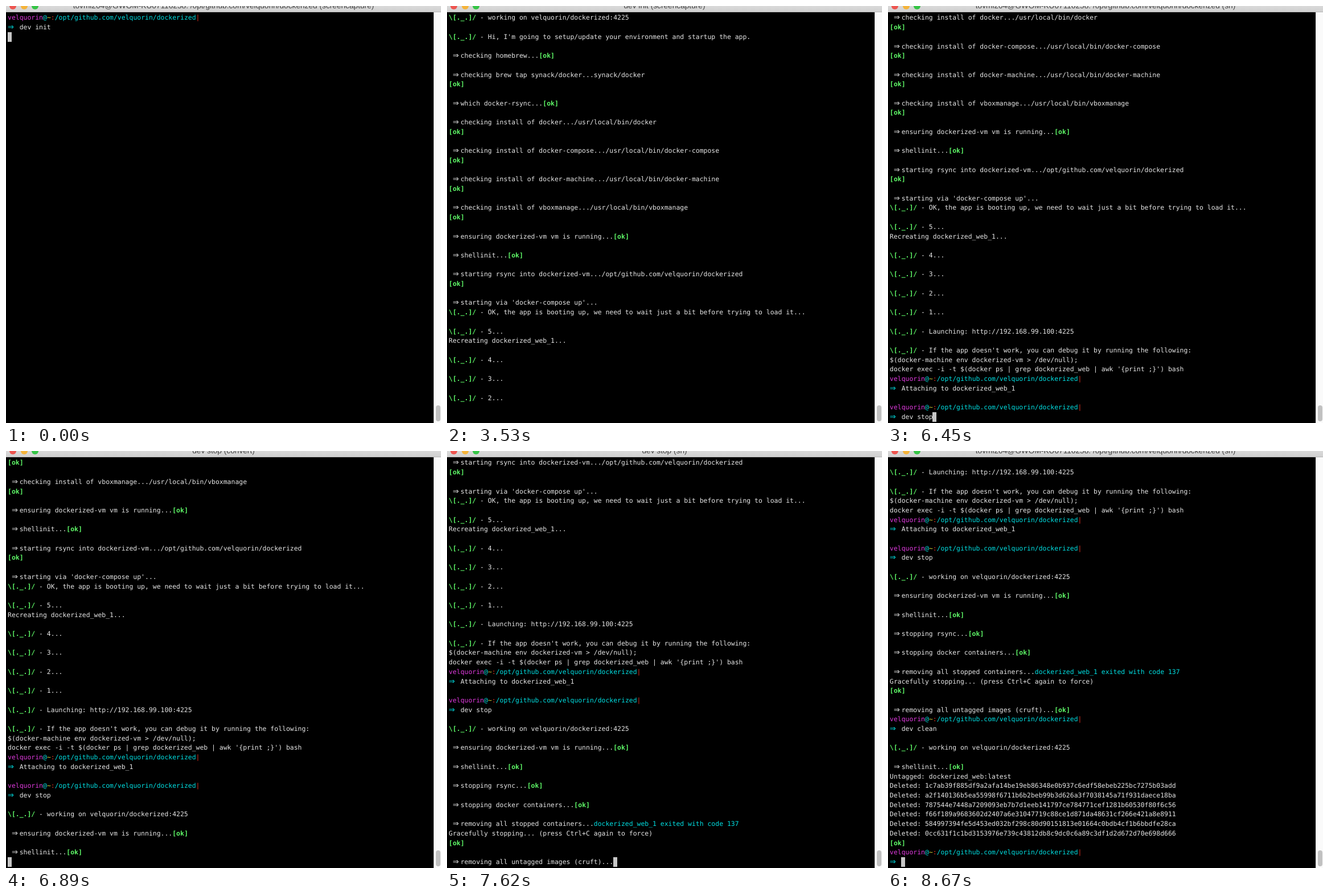
These frames come from a looping animation (764x733 px, 8690 ms). An HTML page:

```html
<!DOCTYPE html>
<html lang="en">
<head>
<meta charset="utf-8">
<title>Terminal session</title>
<style>
  html, body { margin: 0; width: 100%; height: 100%; overflow: hidden; background: #000; }
  body { position: relative; }
  #bar {
    position: absolute; top: -11px; left: 0; width: 764px; height: 22px; z-index: 1; overflow: hidden;
    background: linear-gradient(#e2e2e2, #d0d0d0); box-shadow: inset 0 -1px #b8b8b8;
    font: 13.7px/22px "Liberation Sans", sans-serif; color: #444; text-align: center; white-space: nowrap;
    text-rendering: geometricPrecision;
  }
  #bar i { position: absolute; top: 5px; width: 12px; height: 12px; border-radius: 50%; }
  #screen {
    position: absolute; left: 3px; top: 12.4px; margin: 0; color: #e6e6e6;
    font: 11.444px/16.707px "DejaVu Sans Mono", monospace;
    font-variant-ligatures: none; text-rendering: geometricPrecision;
  }
  #cursor { position: absolute; width: 7px; height: 17px; background: #c7c7c7; }
  #scroll { position: absolute; left: 751px; top: 11px; width: 13px; height: 722px; background: #fafafa; box-shadow: inset 1px 0 #e8e8e8; }
  #scroll i { position: absolute; left: 4px; top: 691px; width: 8px; height: 28px; border-radius: 4px; background: #c1c1c1; }
  .green { color: #5ffa68; font-weight: bold; }
  .cyan { color: #00dfe2; }
  .magenta { color: #e03ade; }
  .yellow { color: #dedb36; }
  .red { color: #e03020; }
  .arrow { display: inline-block; width: 6.89px; font: 13px/0 "DejaVu Sans", sans-serif; }
</style>
</head>
<body>
<div id="bar">
  <i style="left:6px;background:#ee5550"></i><i style="left:26px;background:#f5b43a"></i><i style="left:45px;background:#35c546"></i>
  <span id="title"></span>
</div>
<pre id="screen"></pre>
<div id="cursor"></div>
<div id="scroll"><i></i></div>
<script>
const LOOP = 8690, ROWS = 43, ROW = 16.707, CELL = 6.89;
const USER = 'velquorin', PATH = `/opt/github.com/${USER}/dockerized`;

// Each line is a list of [class, text] segments.
const ok = ['green', '[ok]'];
const plain = text => [['', text]];
const bot = text => [['green', '\\[._.]/'], ['', ' - ' + text]];
const step = (text, ...rest) => [['', ' '], ['arrow', '⇒'], ['', ' ' + text], ...rest];
const shell = text => [['cyan arrow', '⇒'], ['', '  ' + text]];
const blank = [], okLine = [ok];
const prompt = [['magenta', USER], ['cyan', '@'], ['yellow', '~'], ['red', ':'], ['cyan', PATH], ['red', '|']];
const working = bot(`working on ${USER}/dockerized:4225`);
const ensuring = step('ensuring dockerized-vm vm is running...', ok);
const shellinit = step('shellinit...', ok);
const install = name => [step(`checking install of ${name}.../usr/local/bin/${name}`), okLine, blank];

const lines = [
  prompt, shell('dev init'), blank,
  working, blank,
  bot("Hi, I'm going to setup/update your environment and startup the app."), blank,
  step('checking homebrew...', ok), blank,
  step('checking brew tap synack/docker...synack/docker'), okLine, blank,
  step('which docker-rsync...', ok), blank,
  ...['docker', 'docker-compose', 'docker-machine', 'vboxmanage'].flatMap(install),
  ensuring, blank, shellinit, blank,
  step(`starting rsync into dockerized-vm...${PATH}`), okLine, blank,
  step("starting via 'docker-compose up'..."),
  bot('OK, the app is booting up, we need to wait just a bit before trying to load it...'), blank,
  bot('5...'), plain('Recreating dockerized_web_1...'), blank,
  ...[4, 3, 2, 1].flatMap(n => [bot(n + '...'), blank]),
  bot('Launching: http://192.168.99.100:4225'), blank,
  bot("If the app doesn't work, you can debug it by running the following:"),
  plain('$(docker-machine env dockerized-vm > /dev/null);'),
  plain("docker exec -i -t $(docker ps | grep dockerized_web | awk '{print ;}') bash"),
  prompt, shell('Attaching to dockerized_web_1'), blank,
  prompt, shell('dev stop'), blank,
  working, blank, ensuring, blank, shellinit, blank,
  step('stopping rsync...', ok), blank,
  step('stopping docker containers...', ok), blank,
  step('removing all stopped containers...', ['cyan', 'dockerized_web_1 exited with code 137']),
  plain('Gracefully stopping... (press Ctrl+C again to force)'), okLine, blank,
  step('removing all untagged images (cruft)...', ok),
  prompt, shell('dev clean'), blank,
  working, blank, shellinit,
  plain('Untagged: dockerized_web:latest'),
  ...[
    '1c7ab39f885df9a2afa14be19eb86348e0b937c6edf58ebeb225bc7275b03add',
    'a2f140136b5ea55998f6711b6b2beb99b3d626a3f7038145a71f931daece18ba',
    '787544e7448a7209093eb7b7d1eeb141797ce784771cef1281b60530f80f6c56',
    'f66f189a9683602d2407a6e31047719c88ce1d871da48631cf266e421a8e8911',
    '584997394fe5d453ed032bf298c80d90151813e01664c0bdb4cf1b6bbdfe28ca',
    '0cc631f1c1bd3153976e739c43812db8c9dc0c6a89c3df1d2d672d70e698d666'
  ].map(hash => plain('Deleted: ' + hash)),
  okLine, prompt, shell('')
];

const HOME = `tovmi204@GWOM-KU07116258: ${PATH}`;
const WAIT = -1;      // the cursor line is shown up to its "..."
const HIDDEN = null;
const CAPTURE = ' (screencapture)', CONVERT = ' (convert)', SH = ' (sh)';

// One event per typed character, starting with the bare prompt.
const type = (start, end, line, count, title) =>
  Array.from({ length: count + 1 }, (_, i) => [start + (end - start) * i / count, line, 3 + i, title]);

// [time, cursor line, characters on it, title, cursor row shift or HIDDEN]
const events = [
  [0, 2, 0, HOME + CAPTURE],
  [500, 4, 0, 'dev init' + CAPTURE],
  ...[7, 9, 12, 14, 17, 20, 23, 26, 28, 30].map((line, i) => [578 + 78.2 * i, line, WAIT, 'dev init' + CONVERT]),
  [1360, 38, 0, 'dev init' + CONVERT],
  [1420, 38, 0, 'dev init' + CAPTURE],
  [1520, 41, 0, 'dev init' + CONVERT],
  [2520, 43, 0, 'dev init' + CAPTURE, HIDDEN],
  [3530, 45, 0, 'dev init' + CAPTURE, HIDDEN],
  [4530, 47, 0, 'dev init' + CAPTURE, -1],
  [5540, 50, 0, 'dev init' + CONVERT, HIDDEN],
  [5640, 53, 3, HOME + SH],
  [5720, 54, 0, HOME + SH],
  ...type(5790, 6330, 56, 7, HOME + SH),
  [6450, 56, 11, HOME + SH],
  [6530, 57, 0, 'dev stop' + CAPTURE],
  [6620, 60, WAIT, 'dev stop' + CAPTURE],
  [6700, 61, 0, 'dev stop' + CONVERT],
  [6790, 62, WAIT, 'dev stop' + CONVERT],
  [6890, 63, 0, 'dev stop' + CONVERT],
  [6920, 64, WAIT, 'dev stop' + CONVERT],
  [7010, 65, 0, 'dev stop' + CAPTURE],
  [7100, 66, WAIT, 'dev stop' + CAPTURE],
  [7390, 68, WAIT, 'dev stop' + CONVERT],
  [7510, 69, 0, 'dev stop' + CAPTURE],
  [7570, 70, 0, 'dev stop' + SH],
  [7620, 72, WAIT, 'dev stop' + SH],
  ...type(7720, 8230, 74, 8, HOME + CAPTURE),
  [8330, 74, 12, HOME + SH],
  [8430, 75, 0, 'dev clean' + CAPTURE],
  [8530, 78, WAIT, 'dev clean' + CONVERT],
  [8630, 83, 0, 'dev clean' + CONVERT],
  [8670, 88, 3, HOME + SH]
];

const [titleEl, screenEl, cursorEl] = ['title', 'screen', 'cursor'].map(id => document.getElementById(id));

function lineNodes(segments, limit = Infinity) {
  const nodes = [];
  for (const [className, text] of segments) {
    const span = document.createElement('span');
    span.className = className;
    span.textContent = text.slice(0, limit);
    limit = Math.max(0, limit - text.length);
    nodes.push(span);
  }
  return [...nodes, '\n'];
}

function show([, line, chars, title, shift = 0]) {
  if (chars === WAIT) chars = lines[line].map(([, text]) => text).join('').indexOf('...') + 3;
  const top = Math.max(0, line - ROWS + 1);
  titleEl.textContent = title;
  screenEl.replaceChildren(
    ...lines.slice(top, line).flatMap(segments => lineNodes(segments)),
    ...lineNodes(lines[line], chars)
  );
  cursorEl.hidden = shift === HIDDEN;
  cursorEl.style.left = Math.floor(3 + chars * CELL) + 'px';
  cursorEl.style.top = Math.round(12.6 + (line - top + shift) * ROW) + 'px';
}

let current;
function frame() {
  const time = performance.now() % LOOP;
  const event = events.findLast(([start]) => start <= time);
  if (event !== current) show(current = event);
  requestAnimationFrame(frame);
}
frame();
</script>
</body>
</html>
```
